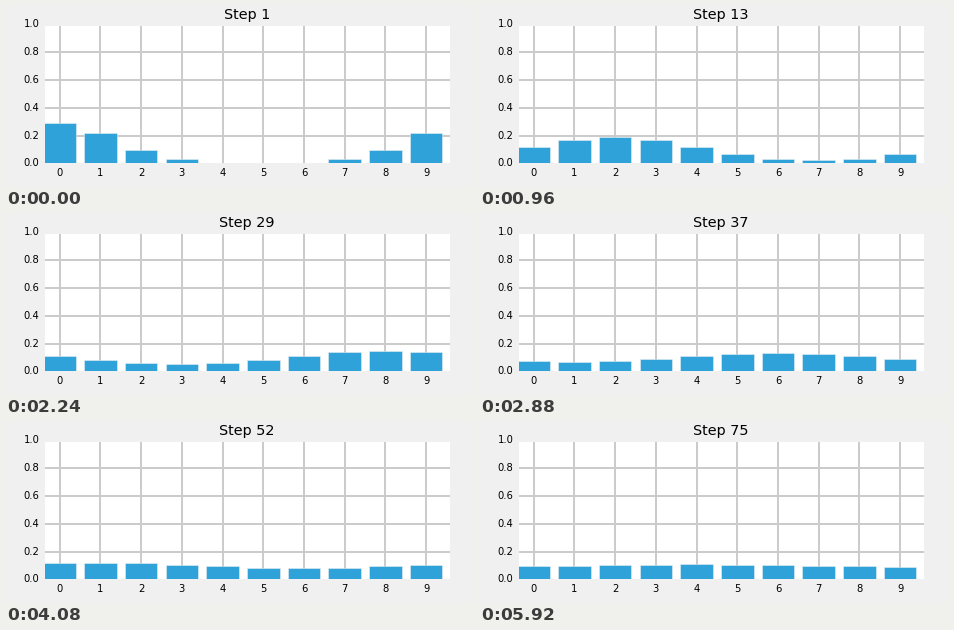
A matplotlib script for the animation above (6000 ms loop, 468 by 180 pixels).

```python
import numpy as np
import matplotlib.pyplot as plt
from matplotlib.animation import FuncAnimation

W, H, DPI = 468, 180, 72
CELLS, STEPS, WARMUP = 10, 75, 10
BACK, GRID, BLUE = "#f0f0f0", "#cbcbcb", "#30a2da"

plt.rcParams.update({"font.family": "DejaVu Sans", "ytick.alignment": "center"})


def predict(belief):
    """Move one cell right on a ring, with 10% under- and overshoot."""
    return 0.1 * belief + 0.8 * np.roll(belief, 1) + 0.1 * np.roll(belief, 2)


def belief_history():
    belief = np.eye(CELLS)[0]
    history = []
    for n in range(WARMUP + STEPS):
        if n >= WARMUP:
            history.append(belief)
        belief = predict(belief)
    return history


beliefs = belief_history()

fig = plt.figure(figsize=(W / DPI, H / DPI), dpi=DPI, facecolor=BACK)
left, right, top, bottom = 37.36, 444.61, 17.7, 157.5
ax = fig.add_axes([left / W, 1 - bottom / H, (right - left) / W, (bottom - top) / H])
ax.set(xlim=(0, CELLS), ylim=(0, 1), facecolor="white")
ax.set_xticks(np.arange(CELLS) + 0.4, [str(i) for i in range(CELLS)])
ax.set_yticks(np.linspace(0, 1, 6))
ax.set_axisbelow(True)
ax.grid(color=GRID, linewidth=2)
ax.tick_params(length=0, pad=4, labelsize=10)
for spine in ax.spines.values():
    spine.set(color=BACK, linewidth=3)

bars = ax.bar(np.arange(CELLS), beliefs[0], width=0.8, align="edge",
              color=BLUE, edgecolor=BACK, linewidth=0.5)
title = ax.set_title("Step 1", fontsize=14.4, pad=5)


def draw(step):
    for bar, p in zip(bars, beliefs[step]):
        bar.set_height(p)
    title.set_text(f"Step {step + 1}")
    return [*bars, title]


anim = FuncAnimation(fig, draw, frames=STEPS, interval=80, repeat=True,
                     repeat_delay=0, blit=False)
plt.show()
```
